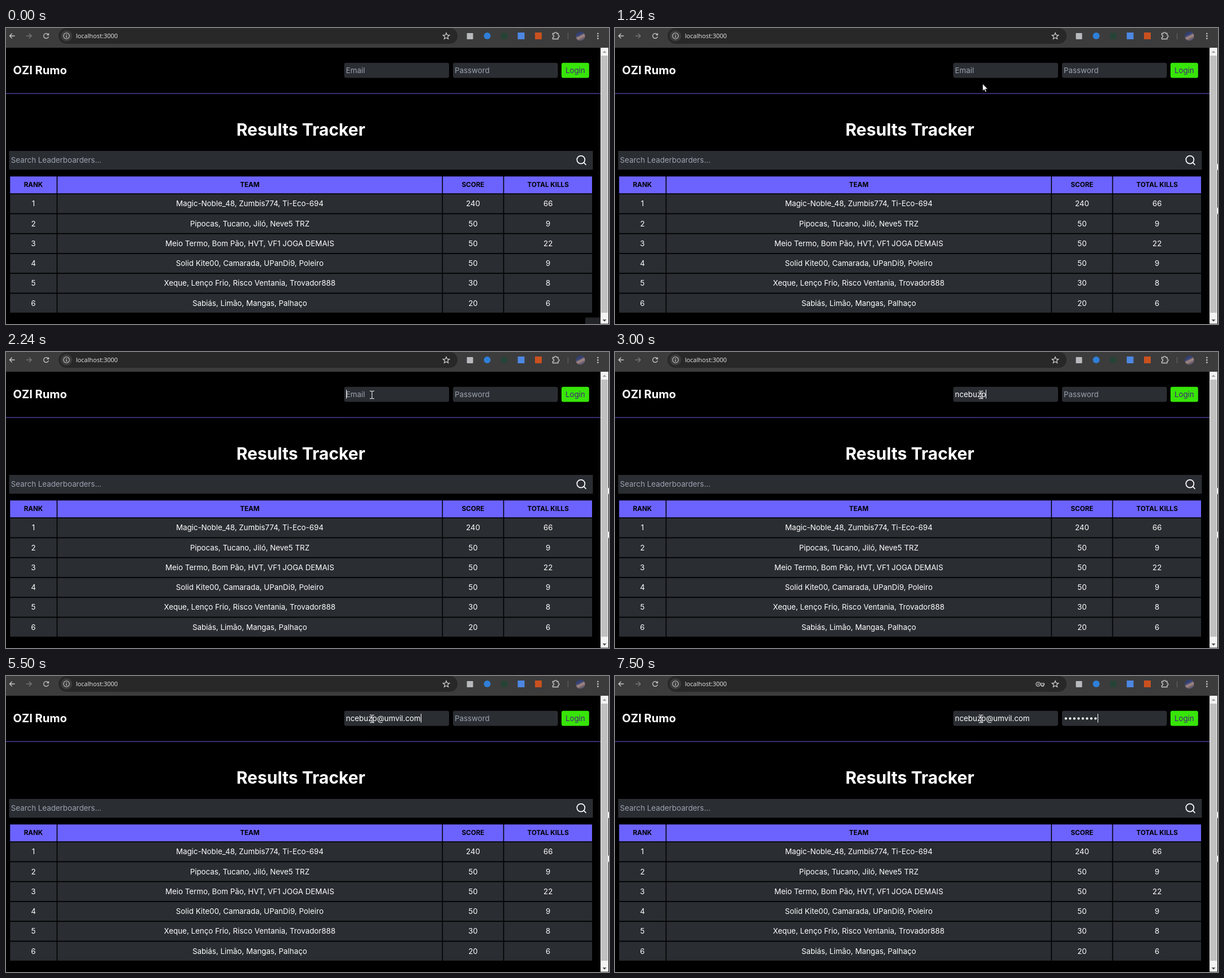
Write an HTML page that moves like this. It is 1067x525 px and loops after 8 s.

```html
<!DOCTYPE html>
<html lang="pt">
<head>
<meta charset="utf-8">
<title>Results Tracker</title>
<style>
html, body { margin: 0; width: 100%; height: 100%; overflow: hidden; background: #000; }
svg { display: block; width: 1067px; height: 525px; }
text { font: 400 13.34px Inter, sans-serif; fill: #fff; white-space: pre; }
.mid { text-anchor: middle; }
.head { font-size: 11.67px; font-weight: 700; fill: #000; }
.hint { fill: #9ca3af; }
.ui { font-family: "Open Sans", sans-serif; }
.box { fill: #2a2d32; }
.line { fill: none; stroke: #c9c9c9; stroke-width: 1.3; }
</style>
</head>
<body>
<svg id="stage" viewBox="0 0 1067 525" xmlns="http://www.w3.org/2000/svg">
  <rect width="1067" height="525" fill="#000"/>

  <g id="toolbar">
    <rect width="1067" height="35" fill="#3c3c3c"/>
    <rect x="93" y="0" width="706" height="28" rx="14" fill="#282828"/>
    <circle cx="107" cy="14" r="10" fill="#3c3c3c"/>
    <path class="line" d="M15.5 14H6.5M10.7 9.7L6.4 14L10.7 18.3"/>
    <path class="line" style="stroke:#777" d="M36 14H45M40.8 9.7L45.1 14L40.8 18.3"/>
    <path class="line" d="M74.6 11.4A4.4 4.4 0 1 0 75.3 15.2M75.4 9.4V12.4H72.2"/>
    <circle class="line" cx="107" cy="14" r="5.2" style="stroke-width:1.1"/>
    <path class="line" d="M107 13.3V17M107 11V12.2"/>
    <text class="ui" x="123.7" y="18.2" style="font-size:11px;fill:#e8e8e8">localhost:3000</text>
    <path id="star" class="line"/>
    <rect x="815.5" y="9" width="11" height="11" rx="1" fill="#b8babd"/>
    <circle cx="851.5" cy="14" r="6" fill="#2f7fd8"/>
    <rect x="876" y="8.5" width="11" height="11" fill="#264436"/>
    <rect x="905.5" y="8" width="12" height="12" fill="#4d87e2"/>
    <rect x="936" y="8" width="12" height="12" fill="#c9511f"/>
    <path class="line" d="M967.5 9.5H970.5A1.9 1.9 0 0 1 974.3 9.5H977V12.6A1.9 1.9 0 0 1 977 16.4V19.5H967.5V16.6A2 2 0 0 0 967.5 12.4Z"/>
    <path d="M994.5 9V20" stroke="#666"/>
    <circle cx="1016.5" cy="14.5" r="8.2" fill="url(#avatar)"/>
    <g fill="#d0d0d0"><circle cx="1047.3" cy="10" r="1.3"/><circle cx="1047.3" cy="14.3" r="1.3"/><circle cx="1047.3" cy="18.6" r="1.3"/></g>
    <g id="key">
      <circle class="line" cx="748.7" cy="14.5" r="3.7"/>
      <circle cx="748.7" cy="14.5" r="1.2" fill="#c9c9c9"/>
      <path class="line" d="M752.2 13.2H759.4V15.8H758V18H755V15.8H752.2"/>
    </g>
  </g>
  <defs>
    <linearGradient id="avatar" x1="0" y1="0" x2=".5" y2="1">
      <stop offset="0" stop-color="#2b3563"/><stop offset=".45" stop-color="#3a4476"/>
      <stop offset=".65" stop-color="#a78a80"/><stop offset="1" stop-color="#57506b"/>
    </linearGradient>
  </defs>

  <text x="12.5" y="82.3" style="font-size:20px;font-weight:700">OZI Rumo</text>
  <rect class="box" x="598.5" y="61.7" width="185.5" height="26.7" rx="3.3"/>
  <rect class="box" x="791" y="61.7" width="185.5" height="26.7" rx="3.3"/>
  <rect x="983" y="61.7" width="48.8" height="26.8" rx="3.3" fill="#37e508"/>
  <text class="mid" x="1007.3" y="79.8" style="fill:#45217d">Login</text>
  <rect y="115.4" width="1052" height="1.7" fill="#3f3788"/>
  <text class="mid" x="521.7" y="191.3" style="font-size:30px;font-weight:700">Results Tracker</text>
  <rect class="box" x="5.5" y="218" width="1033" height="33.3"/>
  <text class="hint" x="8.8" y="239.2">Search Leaderboarders...</text>
  <g fill="none" stroke="#fff" stroke-width="1.7" stroke-linecap="round">
    <circle cx="1017.3" cy="233.6" r="7"/><path d="M1022.4 238.7L1026 242.4"/>
  </g>
  <g id="table"></g>

  <path id="bubble" d="M1025 525V515Q1025 513.5 1026.5 513.5H1052V525Z" fill="#222427"/>

  <g id="scroll">
    <rect x="1052" y="35" width="14" height="489.5" fill="#f4f4f4"/>
    <rect id="thumb" x="1053" y="49" width="12" height="456"/>
    <path d="M1055.5 44L1059 40.2L1062.5 44Z" fill="#a0a0a0"/>
    <path d="M1055.5 517L1059 520.8L1062.5 517Z" fill="#505050"/>
  </g>
  <path id="marks" d="M1067 240.5L1065.2 243V250L1067 252.5ZM1067 318L1065.2 320.5V327.5L1067 330.5Z" fill="#fff"/>

  <text id="email" x="601.6" y="79.7"></text>
  <text id="pass" class="hint" x="794" y="79.7">Password</text>
  <g id="dots" fill="#fff"></g>
  <rect id="caret" y="67" width="1" height="15.6" fill="#fff"/>

  <path id="arrow" d="M.5 .5V13.2L3.4 10.5L5.3 15L7.4 14.1L5.5 9.8H9.6Z" fill="#fff" stroke="#000" stroke-width=".7"/>
  <path id="beam" d="M643.8 69.4H646.4L647.6 70.4L648.8 69.4H651.4M647.6 70.4V81.6M643.8 82.6H646.4L647.6 81.6L648.8 82.6H651.4" fill="none" stroke="#e6e6e6" stroke-width="1.1"/>
  <g id="tip">
    <rect x="654.5" y="87.5" width="110" height="21" fill="#2b2b2b" stroke="#707070"/>
    <text class="ui" x="660" y="101.9" style="font-size:9.4px;fill:#e0e0e0">Preencha este campo.</text>
  </g>
</svg>
<script>
const LOOP = 8000;
const ADDRESS = "ncebuzp@umvil.com";
// [time, characters entered]
const TYPED = [[2750, 4], [3000, 7], [3750, 8], [4250, 10], [4490, 12], [4750, 13], [4990, 14], [5250, 16], [5500, 17]];
const SECRET = [[6750, 1], [7010, 4], [7260, 6], [7500, 8]];
const COLUMNS = [["RANK", 7.3, 82.3], ["TEAM", 91.2, 680.3], ["SCORE", 773.1, 106.6], ["TOTAL KILLS", 881.3, 155.7]];
const TEAMS = [
  ["Magic-Noble_48, Zumbis774, Ti-Eco-694", 240, 66],
  ["Pipocas, Tucano, Jiló, Neve5 TRZ", 50, 9],
  ["Meio Termo, Bom Pão, HVT, VF1 JOGA DEMAIS", 50, 22],
  ["Solid Kite00, Camarada, UPanDi9, Poleiro", 50, 9],
  ["Xeque, Lenço Frio, Risco Ventania, Trovador888", 30, 8],
  ["Sabiás, Limão, Mangas, Palhaço", 20, 6]
];

const el = id => document.getElementById(id);
const show = (id, on) => el(id).style.display = on ? "" : "none";
const between = (t, a, b) => t >= a && t < b;
const countAt = (steps, t) => steps.reduce((n, [at, count]) => t >= at ? count : n, 0);

function add(parent, tag, attrs, label) {
  const node = document.createElementNS("http://www.w3.org/2000/svg", tag);
  for (const name in attrs) node.setAttribute(name, attrs[name]);
  if (label !== undefined) node.textContent = label;
  parent.appendChild(node);
  return node;
}

function buildTable() {
  const table = el("table");
  COLUMNS.forEach(([title, x, width], c) => {
    const mid = x + width / 2;
    add(table, "rect", { x, y: 263.3, width, height: 30, fill: "#6c63ff" });
    add(table, "text", { class: "mid head", x: mid, y: 282.4 }, title);
    TEAMS.forEach((team, r) => {
      const y = 295 + r * 35.27;
      add(table, "rect", { class: "box", x, y, width, height: 33.5 });
      add(table, "text", { class: "mid", x: mid, y: y + 21.4 }, c ? team[c - 1] : r + 1);
    });
  });
}

function buildStar() {
  let d = "";
  for (let i = 0; i < 10; i++) {
    const a = i * Math.PI / 5, r = i % 2 ? 2.7 : 6;
    d += (i ? "L" : "M") + (779 + r * Math.sin(a)).toFixed(2) + " " + (14.6 - r * Math.cos(a)).toFixed(2);
  }
  el("star").setAttribute("d", d + "Z");
}

buildTable();
buildStar();
const dots = Array.from({ length: 8 }, (_, i) => add(el("dots"), "circle", { cx: 797.8 + i * 7.5, cy: 75.4, r: 2.1 }));

function draw(t) {
  show("bubble", t < 250);
  el("thumb").setAttribute("fill", between(t, 490, 990) ? "#a8a8a8" : "#c1c1c1");
  show("marks", t >= 740);

  show("arrow", between(t, 990, 1490));
  el("arrow").setAttribute("transform", t < 1240 ? "translate(670.5 118.5)" : "translate(650 98.5)");
  show("beam", t >= 1490);
  show("tip", between(t, 1990, 2240));

  const typed = countAt(TYPED, t), hidden = countAt(SECRET, t);
  const email = el("email");
  email.textContent = typed ? ADDRESS.slice(0, typed) : "Email";
  email.setAttribute("class", typed ? "" : "hint");
  show("pass", !hidden);
  show("key", hidden);
  dots.forEach((dot, i) => dot.style.display = i < hidden ? "" : "none");

  show("caret", between(t, 2240, 6020) || t >= 6510);
  const x = t >= 6510 ? 794 + hidden * 7.5 : 601.6 + (typed ? email.getComputedTextLength() : 0);
  el("caret").setAttribute("x", Math.round(x));
}

const start = performance.now();
function tick() {
  draw((performance.now() - start) % LOOP);
  requestAnimationFrame(tick);
}
tick();
</script>
</body>
</html>
```
